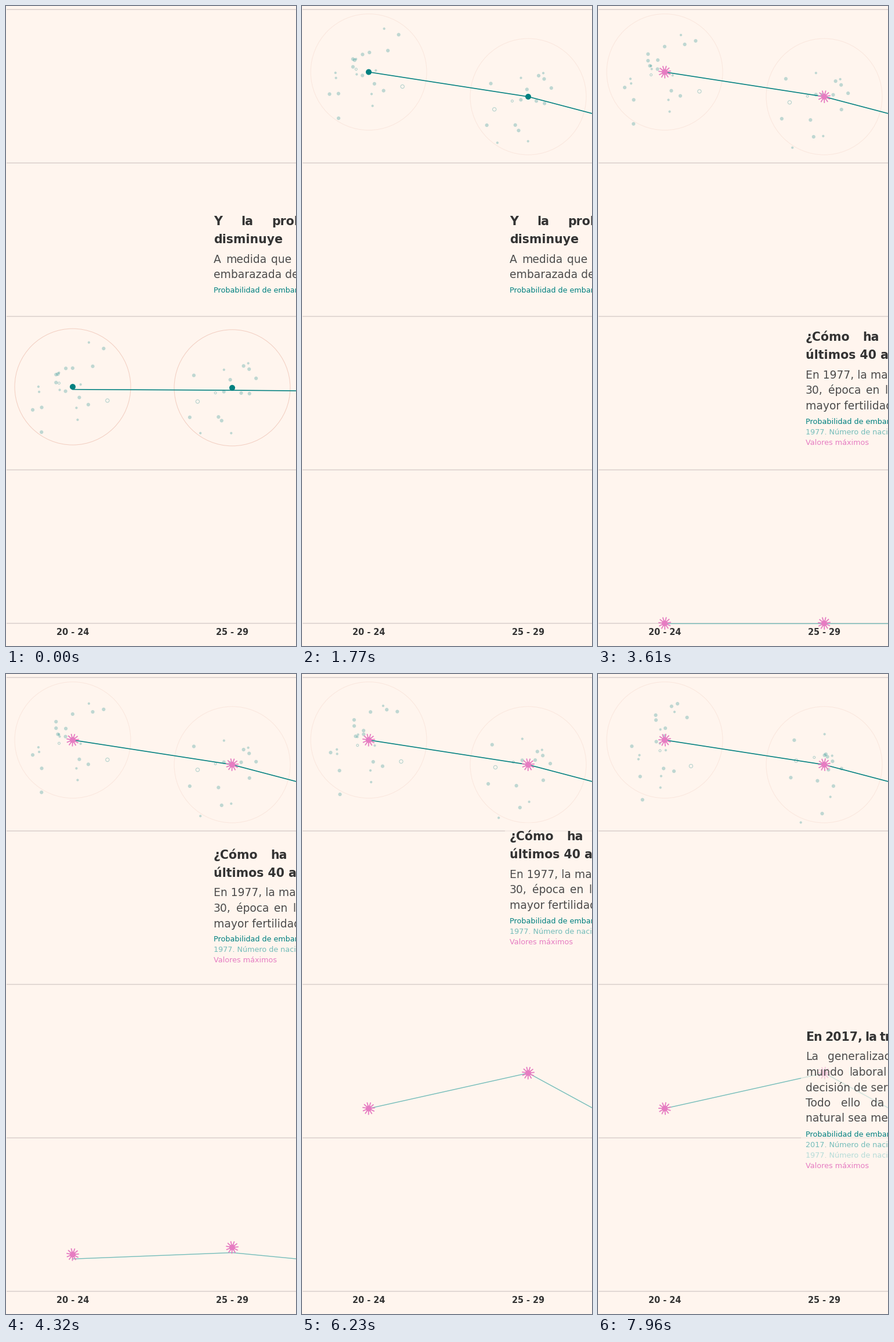
These frames come from a looping animation (500x1101 px, 8000 ms). A matplotlib script:

```python
import numpy as np
import matplotlib.pyplot as plt
from matplotlib.animation import FuncAnimation
from matplotlib.patches import Circle, Rectangle

W, H, DPI = 500, 1101, 128
STEP, LOOP = 40, 8000
PT = 72 / DPI  # points per pixel
BG, INK, GREY, TEAL = "#fff5ee", "#333333", "#4c4c4c", "#008080"
PINK, SOFT, PALE = "#e67cc2", "#74bdba", "#b5dcd8"

# Times in seconds
RISE_START, RISE_TIME, LINE_LAG = -0.40, 1.94, 0.03
BIRTH_START, BIRTH_TIME = 3.62, 1.95
DRIFT_A, DRIFT_B, DRIFT_RATE = 1.5, 5.56, 0.44
ENTER_TIME, ENTER_WAY = 1.15, 860
LEAVE_TIME, LEAVE_WAY = 1.6, 1000

X = np.array([115, 390, 664.5])
FERTILITY = np.array([113.6, 156, 228])
BIRTHS = np.array([747.5, 686.5, 835.5])
RISE_FROM, AXIS = 678, 1062


def ease(u):
    u = np.clip(u, 0, 1)
    return 4 * u**3 if u < 0.5 else 1 - 4 * (1 - u)**3


def rise(t):
    return ease((t - RISE_START) / RISE_TIME)


def birth(t):
    return ease((t - BIRTH_START) / BIRTH_TIME)


def between(start, ends, p):
    return start + (ends - start) * p


fig = plt.figure(figsize=(W / DPI, H / DPI), dpi=DPI, facecolor=BG)
ax = fig.add_axes([0, 0, 1, 1])
ax.set(xlim=(0, W), ylim=(H, 0))
ax.axis("off")


def label(x, y, text, size, color=INK, weight="normal", **kw):
    return ax.text(x, y, text, fontsize=size * PT, color=color, weight=weight,
                   family="DejaVu Sans", va="baseline", **kw)


class Panel:
    """A translucent card of justified text that scrolls up the stage."""
    LEFT = 358
    STYLES = {"h": (20.5, INK, "bold", 31), "p": (18.8, GREY, "normal", 26.5)}
    SMALL = (12.7, "normal", 18)

    def __init__(self, baseline, lines, enter=None, leave=None):
        self.enter, self.leave = enter, leave
        self.top, self.words = baseline - 30, []
        y, before = baseline, None
        for style, text, *gap in lines:
            if style in self.STYLES:
                size, color, weight, advance = self.STYLES[style]
            else:
                color, (size, weight, advance) = style, self.SMALL
            if before is not None:
                # A change of style opens a slightly taller gap
                new_block = style in self.STYLES and style != before
                from_body = style not in self.STYLES and before == "p"
                y += 33.5 if new_block else 25 if from_body else advance
            self.add_line(y, text, gap, size, color, weight)
            before = style
        self.card = ax.add_patch(Rectangle((350, self.top), 200, y + 14 - self.top,
                                           fc=BG, alpha=0.65, lw=0, zorder=8))

    def add_line(self, y, text, gap, size, color, weight):
        """Without a gap the line is plain; with one its words are spaced by it."""
        x = self.LEFT
        for word in text.split() if gap else [text]:
            item = label(x, y, word, size, color, weight, zorder=9)
            self.words.append((item, y))
            if gap:
                x += item.get_window_extent().width + gap[0]

    def offset(self, t):
        dy = 0
        if self.enter is not None:
            u = np.clip((t - self.enter) / ENTER_TIME, 0, 1)
            dy += ENTER_WAY * (1 - u)**2
        if self.leave is not None:
            dy -= LEAVE_WAY * ease((t - self.leave) / LEAVE_TIME)
        return dy

    def update(self, t):
        dy = self.offset(t)
        self.card.set_y(self.top + dy)
        for item, y in self.words:
            item.set_y(y + dy)
            item.set_visible(-20 < y + dy < H + 20)


panels = [
    Panel(377, [("h", "Y la probabilidad", 32), ("h", "disminuye"),
                ("p", "A medida que pasa", 8), ("p", "embarazada de"),
                (TEAL, "Probabilidad de embarazo")], leave=1.80),
    Panel(318, [("h", "¿Cómo ha cambiado", 22), ("h", "últimos 40 años"),
                ("p", "En 1977, la mayoría"), ("p", "30, época en la", 9),
                ("p", "mayor fertilidad"),
                (TEAL, "Probabilidad de embarazo"),
                (SOFT, "1977. Número de nacimientos"),
                (PINK, "Valores máximos")], enter=3.10, leave=5.90),
    Panel(631, [("h", "En 2017, la tradición", 4.5),
                ("p", "La generalización", 16), ("p", "mundo laboral", 10),
                ("p", "decisión de ser\n"), ("p", "Todo ello da", 18),
                ("p", "natural sea menos"),
                (TEAL, "Probabilidad de embarazo"),
                (SOFT, "2017. Número de nacimientos"),
                (PALE, "1977. Número de nacimientos"),
                (PINK, "Valores máximos")], enter=6.83)
] if False else []


def paragraph_panels():
    legend = (TEAL, "Probabilidad de embarazo")
    peak = (PINK, "Valores máximos")
    return [
        Panel(377, [("h", "Y la probabilidad", 32), ("h", "disminuye"),
                    ("p", "A medida que pasa", 8), ("p", "embarazada de"),
                    legend], leave=1.80),
        Panel(318, [("h", "¿Cómo ha cambiado", 22), ("h", "últimos 40 años"),
                    ("p", "En 1977, la mayoría"), ("p", "30, época en la", 9),
                    ("p", "mayor fertilidad"), legend,
                    (SOFT, "1977. Número de nacimientos"), peak],
              enter=3.10, leave=5.90),
        Panel(631, [("h", "En 2017, la tradición", 4.5),
                    ("p", "La generalización", 16), ("p", "mundo laboral", 10),
                    ("p", "decisión de ser"), ("p", "Todo ello da", 18),
                    ("p", "natural sea menos"), legend,
                    (SOFT, "2017. Número de nacimientos"),
                    (PALE, "1977. Número de nacimientos"), peak], enter=6.83),
    ]


panels = paragraph_panels()

for y in range(6, H, 264):
    ax.plot([2, W + 5], [y, y], color="#ddd4d0", lw=1.7 * PT, zorder=1)
label(115, 1082, "20 - 24", 14.5, weight="bold", ha="center")
label(389.5, 1082, "25 - 29", 14.5, weight="bold", ha="center")


class Cloud:
    """Scattered dots drifting inside a thin circle."""

    def __init__(self, x, count, seed):
        rng = np.random.default_rng(seed)
        self.x = x
        self.home = np.clip(rng.normal(0, 36, (count, 2)), -78, 78)
        # Sideways every dot heads for the middle, vertically either way
        self.drift = rng.uniform(10, 15, (count, 2))
        self.drift[:, 0] *= -np.sign(self.home[:, 0])
        self.drift[:, 1] *= rng.choice([-1, 1], count)
        radius = rng.choice([2.1, 3.1], count, p=[0.42, 0.58])
        radius[:2] = 1.9, 3.1
        ring = np.arange(count) < 2
        faces = [(0, 0.5, 0.5, 0 if r else 0.25) for r in ring]
        edges = [(0, 0.5, 0.5, 0.3 if r else 0) for r in ring]
        self.ring = ax.add_patch(Circle((x, 0), 100, fill=False, lw=PT,
                                        ec="#e0957f", zorder=2))
        self.points = ax.scatter(*self.home.T, s=(2 * radius * PT)**2, c=faces,
                                 edgecolors=edges, linewidths=1.1 * PT, zorder=3)

    def update(self, t, y):
        self.ring.center = (self.x, y)
        self.ring.set_alpha(0.42 - 0.27 * rise(t))
        first = np.clip((t - DRIFT_A) * DRIFT_RATE, 0, 1)
        second = max(0, (t - DRIFT_B) * DRIFT_RATE)
        # Sideways drift starts over when the second curve appears
        across = first if t < BIRTH_START else second
        shift = self.drift * [across, first + second]
        self.points.set_offsets(self.home + shift + [self.x, y])


class Star:
    """A pink core with turning rays."""
    RAYS = 11

    def __init__(self, x):
        self.x = x
        self.rays, = ax.plot([], [], color=PINK, lw=1.8 * PT, zorder=6)
        self.core = ax.add_patch(Circle((x, 0), 5, color=PINK, lw=0, zorder=7))

    def update(self, t, y):
        for part in (self.rays, self.core):
            part.set_visible(t >= BIRTH_START)
        angle = np.arange(self.RAYS) * 2 * np.pi / self.RAYS + t * 0.9
        r = np.array([4, 10, np.nan])
        self.rays.set_data((self.x + np.outer(np.cos(angle), r)).ravel(),
                           (y + np.outer(np.sin(angle), r)).ravel())
        self.core.center = (self.x, y)


clouds = [Cloud(X[0], 23, 4), Cloud(X[1], 17, 9)]
cores = [ax.add_patch(Circle((x, 0), 5, color=TEAL, lw=0, zorder=5)) for x in X[:2]]
top_stars = [Star(x) for x in X[:2]]
low_stars = [Star(x) for x in X[:2]]
fertility_line, = ax.plot([], [], color=TEAL, lw=1.6 * PT, zorder=4)
birth_line, = ax.plot([], [], color=SOFT, lw=1.4 * PT, zorder=4)


def update(i):
    t = (i + 0.5) * STEP / 1000
    high = between(RISE_FROM, FERTILITY, rise(t))
    low = between(AXIS, BIRTHS, birth(t))
    fertility_line.set_data(X, between(RISE_FROM, FERTILITY, rise(t - LINE_LAG)))
    birth_line.set_data(X, between(AXIS, BIRTHS, birth(t - LINE_LAG)))
    birth_line.set_visible(t >= BIRTH_START)
    for k in range(2):
        clouds[k].update(t, high[k])
        cores[k].center = (X[k], high[k])
        cores[k].set_visible(t < BIRTH_START)
        top_stars[k].update(t, high[k])
        low_stars[k].update(t, low[k])
    for panel in panels:
        panel.update(t)
    return []


anim = FuncAnimation(fig, update, frames=LOOP // STEP, interval=STEP,
                     repeat=True, repeat_delay=0, blit=False)
plt.show()
```
